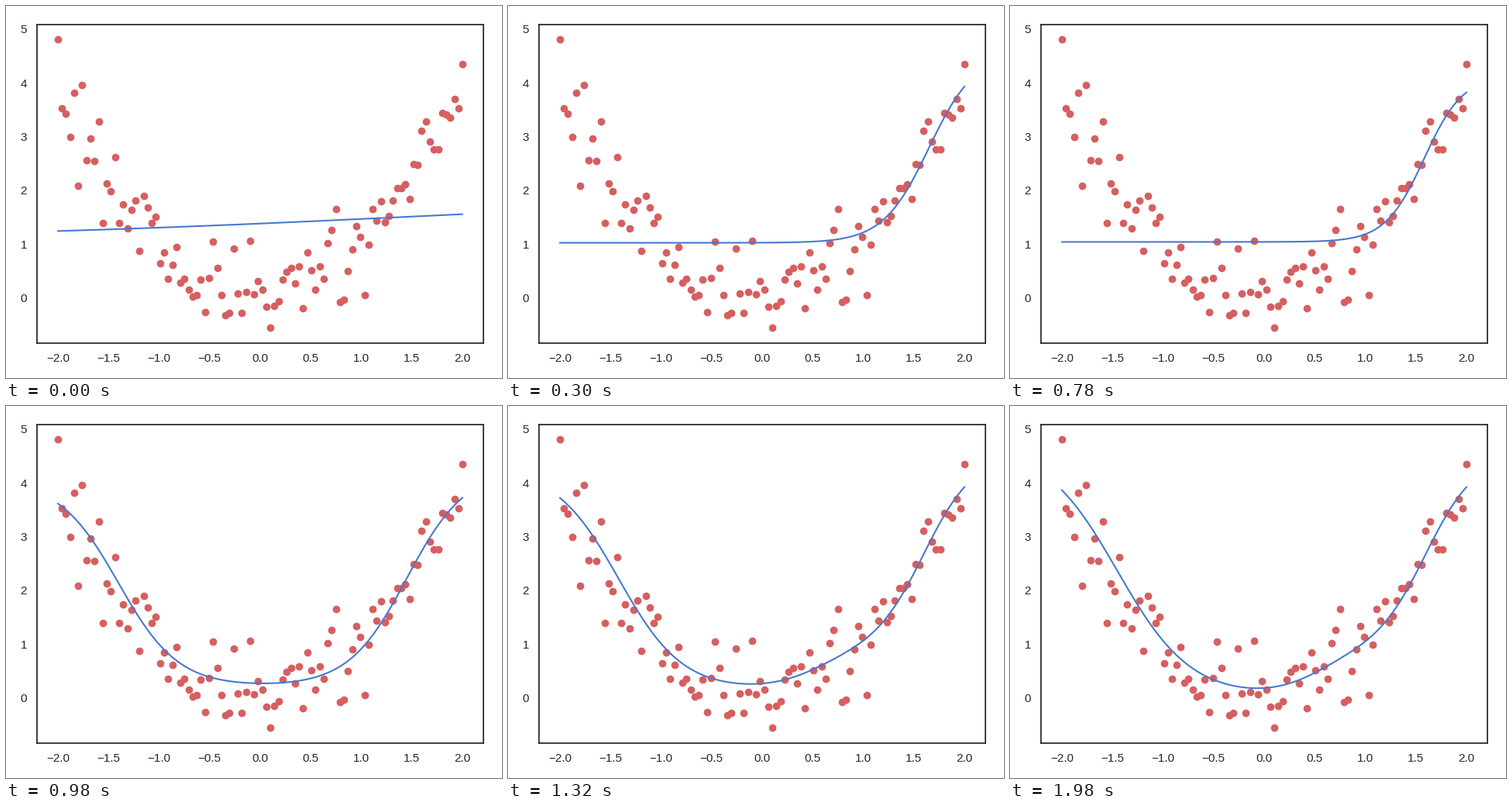
A matplotlib script that plays this animation: 640x480 px, repeating every 2 s.

```python
import numpy as np
import matplotlib.pyplot as plt
from matplotlib.animation import FuncAnimation

W, H, DPI = 640, 480, 100
FRAMES, STEP = 100, 20
INK, RED, BLUE = "0.15", "#D65F5F", "#4878CF"

plt.rcParams.update({"font.family": "Liberation Sans", "font.size": 12})

# Noisy parabola to be fitted
rng = np.random.RandomState(1)
x = np.linspace(-2, 2, 100)
y = x ** 2 + 0.5 * rng.randn(100)


def ramp(t, start, end):
    return np.clip((t - start) / (end - start), 0, 1)


def ease(t, start, end):
    u = ramp(t, start, end)
    return u * u * (3 - 2 * u)


def chain(value, *steps):
    """Move a value towards each goal in turn, by that step's progress."""
    value = np.asarray(value, float)
    for progress, goal in steps:
        value = value + progress * (np.asarray(goal) - value)
    return value


def unit(height, slope, centre):
    return height / (1 + np.exp(-slope * (x - centre)))


def predict(t):
    grow = ease(t, 0, 240)         # the right side bends up
    drift = ramp(t, 240, 780)      # long plateau
    wake = ease(t, 780, 940)       # the left side joins in
    tune = ease(t, 980, 1250)      # a third, smaller unit appears
    refine = ramp(t, 980, 1980)

    bias = chain(1.067, (grow, 1.022), (drift, 1.04), (wake, 0.21), (refine, 0))
    right = chain((0.89, 0.4, 1.5), (grow, (3.58, 4.3, 1.655)),
                  (drift, (3.1, 5.2, 1.58)), (wake, (4.04, 3.46, 1.45)),
                  (tune, (3.7, 4, 1.6)))
    left = chain((0, -1.6, -1.2), (wake, (3.85, -3.4, -1.4)),
                 (refine, (4.72, -2.75, -1.45)))
    bump = tune * (0.85 - bias), 4, 0.53
    return bias + unit(*right) + unit(*left) + unit(*bump)


fig = plt.figure(figsize=(W / DPI, H / DPI), dpi=DPI, facecolor="white")
left, right, bottom, top = 40.2, 615.8, 45.2, 456.44
ax = fig.add_axes([left / W, bottom / H, (right - left) / W, (top - bottom) / H])
for spine in ax.spines.values():
    spine.set(edgecolor=INK, linewidth=1.25)
ax.tick_params(length=0, pad=9.5, labelsize=11, labelcolor=INK)

ax.scatter(x, y, color=RED)
line, = ax.plot(x, predict(0), color=BLUE, lw=1.5, solid_capstyle="round")
ax.margins(0.051, 0.052)
ax.set_xticks(np.arange(-2, 2.1, 0.5))
ax.set_yticks(range(6))
ax.autoscale(False)


def update(i):
    line.set_ydata(predict(i * STEP))
    return line,


anim = FuncAnimation(fig, update, frames=FRAMES, interval=STEP,
                     repeat=True, repeat_delay=0)
plt.show()
```
